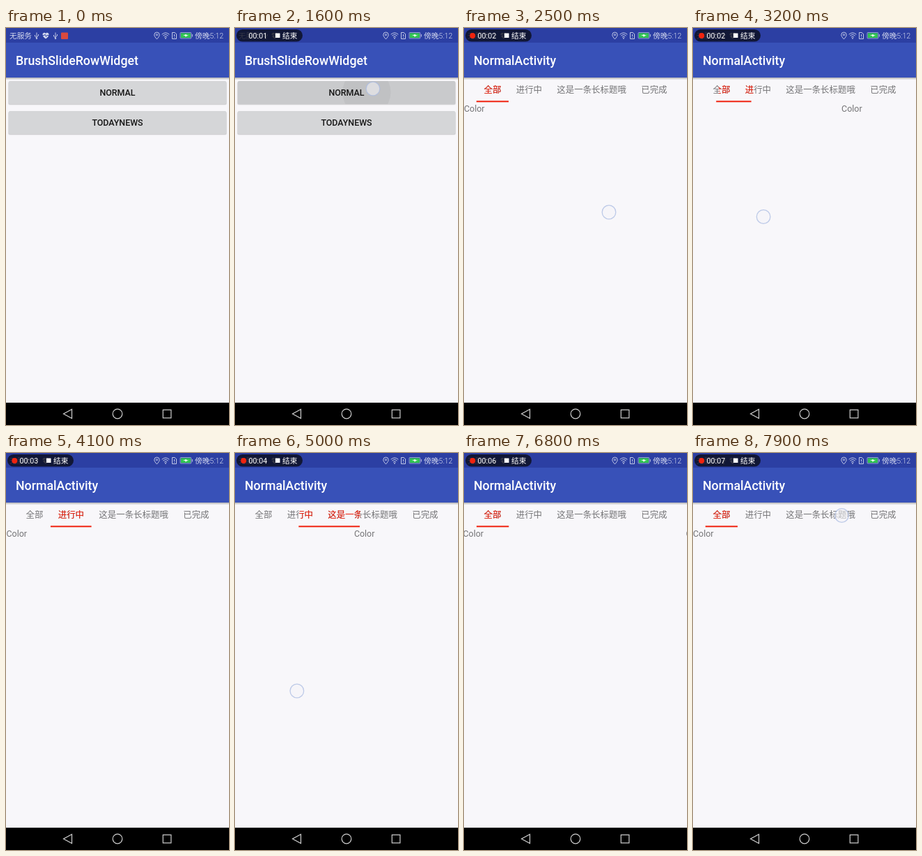
Write an HTML page that moves like this. It is 320x569 px and loops after 8000 ms.

```html
<!DOCTYPE html>
<html lang="zh-CN">
<head>
<meta charset="utf-8">
<title>Tab colour tracking</title>
<style>
  html, body { margin: 0; width: 100%; height: 100%; overflow: hidden; background: #000; }
  svg { display: block; width: 100%; height: 100%; }
  text { font-family: Roboto, "Noto Sans CJK SC", "Noto Sans CJK", sans-serif; font-size: 12.44px; white-space: pre; }
  .title { font-size: 17.78px; font-weight: 500; fill: #fff; }
  .button { font-weight: 500; fill: #161616; text-anchor: middle; }
  .status { font-size: 10.67px; font-weight: 300; fill: #d3d8ee; }
  .pill { font-size: 10.67px; fill: #fff; }
  .label { fill: #747476; }
  .active { fill: #f0220f; }
  .line { fill: none; stroke: #d3d8ee; stroke-width: .9; }
  .nav { fill: none; stroke: #cfcfcf; stroke-width: 1.2; }
</style>
</head>
<body>
<svg viewBox="0 0 320 569" xmlns="http://www.w3.org/2000/svg">
  <defs>
    <linearGradient id="shade" x2="0" y2="1">
      <stop stop-color="#000" stop-opacity=".28"/>
      <stop offset="1" stop-color="#000" stop-opacity="0"/>
    </linearGradient>
    <clipPath id="firstButton"><rect x="4" y="76" width="312" height="33" rx="1.8"/></clipPath>
    <g id="window">
      <rect width="320" height="537" fill="#f8f7fa"/>
      <rect width="320" height="21" fill="#2c3fa3"/>
      <rect y="21" width="320" height="50" fill="#3851b8"/>
      <rect y="71" width="320" height="3.5" fill="url(#shade)"/>
    </g>
    <g id="button">
      <rect x="3" y=".5" width="314" height="34" rx="2.2" fill="#000" opacity=".07"/>
      <rect x="3.6" y=".8" width="312.8" height="33" rx="2" fill="#000" opacity=".12"/>
      <rect x="4" width="312" height="33" rx="1.8" fill="#d5d6d8"/>
    </g>
    <g id="usb" class="line">
      <path d="M0-4.5V4M-2.5-1V1L0 3M2.5-2V0L0 2"/>
      <circle cy="4" r=".8"/>
    </g>
  </defs>

  <g id="home">
    <use href="#window"/>
    <text class="title" x="14" y="53.3">BrushSlideRowWidget</text>
    <use href="#button" y="76"/>
    <g clip-path="url(#firstButton)">
      <rect id="pressed" x="4" y="76" width="312" height="33" opacity=".055"/>
      <circle id="ripple" cy="92" opacity=".045"/>
    </g>
    <text class="button" x="160" y="97.4">NORMAL</text>
    <use href="#button" y="119"/>
    <text class="button" x="160" y="140.2">TODAYNEWS</text>
  </g>
  <rect id="dim" width="320" height="537" fill="#000"/>

  <g id="detail">
    <use href="#window"/>
    <text class="title" x="14" y="53.3">NormalActivity</text>
    <g id="tabs"></g>
    <rect id="indicator" class="active" y="104.3" height="2"/>
    <g id="pages"></g>
  </g>

  <g id="statusBar">
    <text class="status" x="5" y="15">无服务</text>
    <use href="#usb" x="44" y="11"/>
    <path d="M57 15.500C54 13.500 52.500 11.500 52.500 9.300C52.500 6.500 56 6 57 8C58 6 61.500 6.500 61.500 9.300C61.500 11.500 60 13.500 57 15.500" fill="#d3d8ee"/>
    <path d="M52 10.500H55L56 9L57.500 12.500L58.500 10.500H62" fill="none" stroke="#2c3fa3" stroke-width=".9"/>
    <g id="notices">
      <use href="#usb" x="71" y="11"/>
      <rect x="79" y="6.500" width="10" height="9.500" rx="1" fill="#d94a3e"/>
    </g>
    <g class="line">
      <path d="M216.500 16C214.500 13.500 212.800 12 212.800 9.800A3.700 3.700 0 0 1 220.200 9.800C220.200 12 218.500 13.500 216.500 16Z"/>
      <circle cx="216.500" cy="9.700" r="1.100"/>
      <path d="M223.700 9.200Q229 4.600 234.300 9.200M225.300 11.200Q229 8 232.700 11.200M227 13.200Q229 11.400 231 13.200"/>
      <path d="M238.500 6.500H242L244.500 8.500V15.500H238.500ZM241.500 9V12M241.500 13V14"/>
      <rect x="250" y="6.500" width="15.800" height="8.500" rx="1" opacity=".7"/>
      <path d="M267.300 9V12.500"/>
    </g>
    <circle cx="229" cy="14.800" r=".9" fill="#d3d8ee"/>
    <rect x="250.900" y="7.400" width="14" height="6.700" fill="#30c552"/>
    <path d="M254 11L259 8.800L258.600 10.300H262L257 12.800L257.500 11Z" fill="#fff"/>
    <text class="status" x="271" y="15">傍晚5:12</text>
  </g>

  <g id="recorder">
    <rect x="2" y="2" width="95" height="17.500" rx="8.750" fill="#0b0d1c" opacity=".8"/>
    <circle id="recordDot" cx="12.300" cy="11" r="4" fill="#f0240f"/>
    <text id="clock" class="pill" x="19.600" y="15"></text>
    <rect x="58" y="7.500" width="6.500" height="6.500" fill="#fff"/>
    <text class="pill" x="68" y="15">结束</text>
  </g>

  <rect y="537" width="320" height="32"/>
  <g class="nav">
    <path d="M94.500 546.500V559.500L82.500 553Z"/>
    <circle cx="160" cy="553" r="6.800"/>
    <rect x="225.300" y="547.300" width="11.600" height="11.600"/>
  </g>
  <circle id="touch" r="9.800" fill="#f4f4f8" fill-opacity=".55" stroke="#a9bbe2" stroke-opacity=".75" stroke-width="1.300"/>
</svg>

<script>
const LOOP = 8000, STEP = 100, WIDTH = 320, EM = 12.44, PAD = 10.67;
const $ = id => document.getElementById(id);
const set = (node, attrs) => { for (const k in attrs) node.setAttribute(k, attrs[k]); };
const show = (node, on) => { node.style.display = on ? "" : "none"; };
const clamp = v => Math.min(1, Math.max(0, v));
const mix = (a, b, k) => a + (b - a) * k;
const settle = k => 1 - (1 - k) ** 5;

function add(parent, name, attrs, text = "") {
  const node = document.createElementNS("http://www.w3.org/2000/svg", name);
  set(node, attrs);
  node.textContent = text;
  return parent.appendChild(node);
}

// Rows are [time, value, easing into this row].
function track(rows, t) {
  if (t <= rows[0][0]) return rows[0][1];
  for (let i = 1; i < rows.length; i++) {
    const [t0, v0] = rows[i - 1], [t1, v1, ease = k => k] = rows[i];
    if (t <= t1) return mix(v0, v1, ease((t - t0) / (t1 - t0)));
  }
  return rows[rows.length - 1][1];
}

const pagePosition = [
  [2500, 0], [3200, .334], [3900, .65], [4200, 1, settle],
  [4300, 1], [5000, 1.466], [6070, 1.72], [6320, 2, settle],
  [6450, 2], [6950, 0, settle]
];
const drags = [
  { from: 2500, to: 3900, x: 208, page: 0, y: [[2500, 264], [3200, 270.5], [3900, 281]] },
  { from: 4300, to: 6070, x: 238, page: 1, y: [[4300, 335], [5000, 341], [5400, 343], [6070, 334]] }
];
const taps = [
  { from: 1300, to: 1650, x: 198, y: 87 },
  { from: 6400, to: 6500, x: 41, y: 86 },
  { from: 7900, to: 8000, x: 213.5, y: 89.5 }
];

const names = ["全部", "进行中", "这是一条长标题哦", "已完成"];
const stripWidth = names.reduce((sum, s) => sum + s.length * EM + 2 * PAD, 0);
let left = (WIDTH - stripWidth) / 2;
const tabs = names.map((name, i) => {
  const width = name.length * EM + 2 * PAD;
  const at = { x: left + PAD, y: 93.3 };
  const clip = add($("tabs"), "clipPath", { id: "reveal" + i });
  const reveal = add(clip, "rect", { y: 72, height: 32 });
  add($("tabs"), "text", { ...at, class: "label" }, name);
  const group = add($("tabs"), "g", { "clip-path": `url(#reveal${i})` });
  add(group, "text", { ...at, class: "active" }, name);
  const tab = { left, width, reveal };
  left += width;
  return tab;
});
const pages = names.map(() => add($("pages"), "text", { class: "label", y: 120.3 }, "Color"));

function drawPager(p) {
  const i = Math.min(Math.floor(p), tabs.length - 2), k = p - i;
  const a = tabs[i], b = tabs[i + 1];
  set($("indicator"), { x: mix(a.left, b.left, k), width: mix(a.width, b.width, k) });
  tabs.forEach((tab, n) => {
    const textWidth = tab.width - 2 * PAD, d = p - n;
    set(tab.reveal, {
      x: tab.left + PAD + clamp(d) * textWidth,
      width: Math.max(0, 1 - Math.abs(d)) * textWidth
    });
    set(pages[n], { x: (n - p) * WIDTH });
  });
}

function drawTouch(t, p) {
  const held = e => t >= e.from && t < e.to;
  const drag = drags.find(held), tap = taps.find(held);
  show($("touch"), drag || tap);
  if (drag) set($("touch"), { cx: drag.x - (p - drag.page) * WIDTH, cy: track(drag.y, t) });
  else if (tap) set($("touch"), { cx: tap.x, cy: tap.y });
}

function drawRecorder(t) {
  const recording = t >= 100;
  show($("recorder"), recording);
  show($("notices"), !recording);
  show($("recordDot"), t < 400 || (t - 400) % 1100 >= 200);
  $("clock").textContent = "00:0" + Math.max(0, Math.floor((t - 500) / 1000));
}

function draw(t) {
  const opened = settle(clamp((t - 1612) / 388));
  const p = track(pagePosition, t);
  set($("home"), { transform: `translate(${-135 * opened})` });
  set($("dim"), { opacity: .42 * opened });
  set($("detail"), { transform: `translate(${WIDTH * (1 - opened)})` });
  show($("detail"), opened > 0);

  const press = clamp((t - 1340) / 1080);
  show($("pressed"), press > 0);
  set($("ripple"), { cx: mix(198, 160, press), r: 144 * press });

  drawRecorder(t);
  drawPager(p);
  drawTouch(t, p);
}

let start;
function tick(now) {
  start ??= now;
  draw(Math.floor((now - start) % LOOP / STEP) * STEP);
  requestAnimationFrame(tick);
}
draw(0);
requestAnimationFrame(tick);
</script>
</body>
</html>
```
